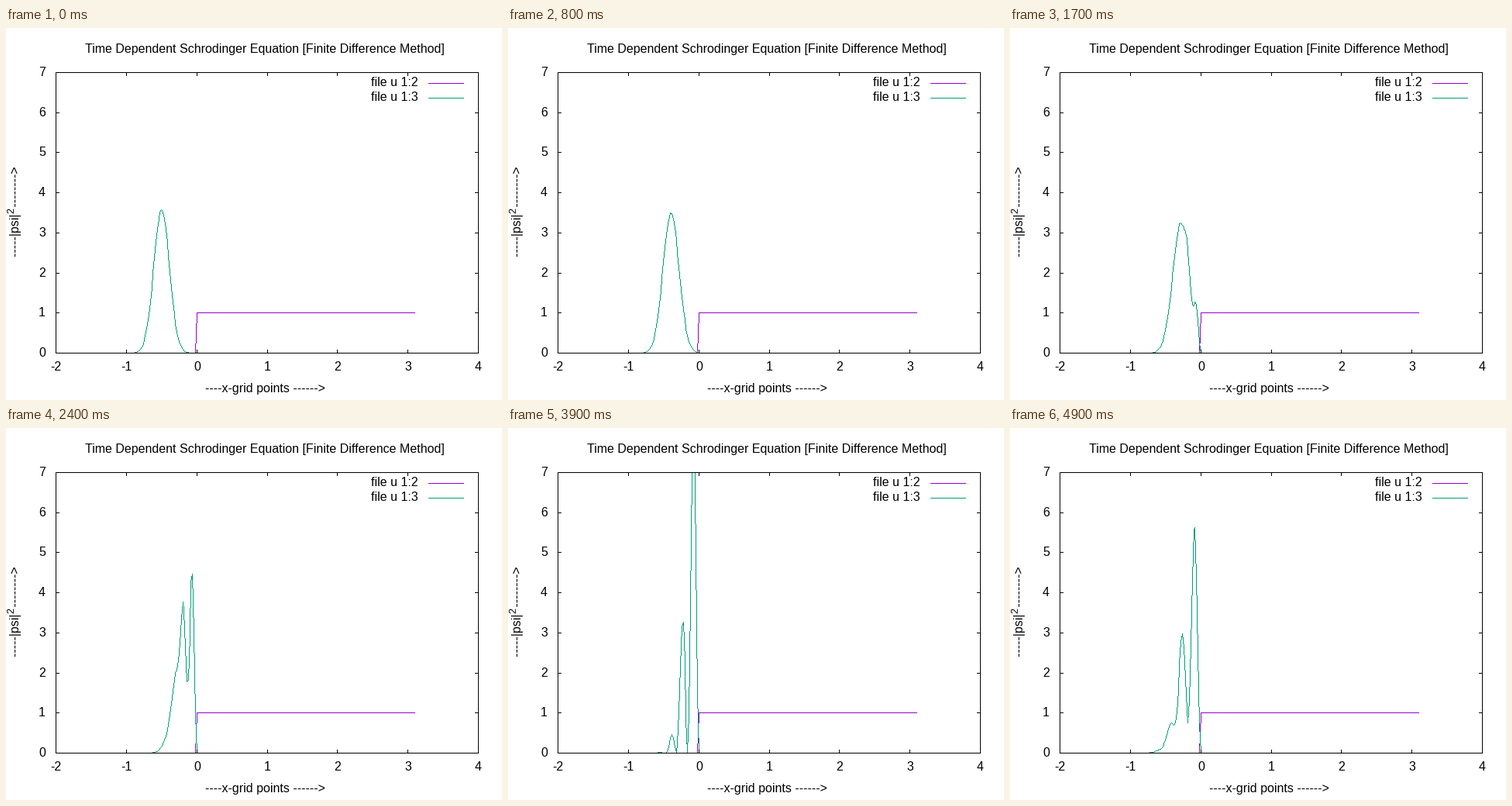
A matplotlib script that plays this animation: 640x480 px, repeating every 5000 ms.

```python
import numpy as np
import matplotlib.pyplot as plt
from matplotlib.animation import FuncAnimation
from matplotlib.colors import to_rgba

WIDTH, HEIGHT, DPI = 640, 480, 100
FRAMES, INTERVAL = 50, 100
PT = 72 / DPI                                # one pixel in points
LEFT, RIGHT, TOP, BOTTOM = 64, 609, 57, 419  # plot frame, pixel rows and columns
GREEN, PURPLE = "#009e73", "#9400d3"

plt.rcParams["font.family"] = "Liberation Sans"

# Gaussian packet on a lattice, running into a hard wall at x = 0
DX = 0.02
WAVE_NUMBER = 20
START = -0.5
TIME_STEP = 0.000683

grid = DX * np.arange(-155, 1)
inner = grid[1:-1]
hop = np.full(len(inner) - 1, -0.5 / DX**2)
hamiltonian = np.eye(len(inner)) / DX**2 + np.diag(hop, 1) + np.diag(hop, -1)
energies, modes = np.linalg.eigh(hamiltonian)
packet = (40 / np.pi) ** 0.25 * np.exp(-20 * (inner - START) ** 2 + 1j * WAVE_NUMBER * inner)
weights = modes.T @ packet


def density(frame):
    psi = modes @ (weights * np.exp(-1j * energies * TIME_STEP * frame))
    return np.concatenate(([0], np.abs(psi) ** 2, [0]))


def nearest(value):
    return np.floor(np.asarray(value) + 0.5).astype(int)


def column(x):
    return nearest(LEFT + (np.asarray(x) + 2) * (RIGHT - LEFT) / 6)


def row(y):
    return nearest(BOTTOM - np.asarray(y) * (BOTTOM - TOP) / 7)


def paint(image, xs, ys, color):
    """Draw a one-pixel polyline without smoothing, clipped to the plot frame."""
    cols, rows = column(xs), row(ys)
    for c0, r0, c1, r1 in zip(cols, rows, cols[1:], rows[1:]):
        count = max(abs(c1 - c0), abs(r1 - r0)) + 1
        c = nearest(np.linspace(c0, c1, count)) - LEFT
        r = nearest(np.linspace(r0, r1, count)) - TOP
        inside = (c >= 0) & (c < image.shape[1]) & (r >= 0) & (r < image.shape[0])
        image[r[inside], c[inside]] = to_rgba(color)


fig = plt.figure(figsize=(WIDTH / DPI, HEIGHT / DPI), dpi=DPI, facecolor="white")
ax = fig.add_axes([0, 0, 1, 1])
ax.axis("off")


def stroke(x0, y0, x1, y1, color="black"):
    ax.plot([x0, x1], [y0, y1], color=color, lw=PT, snap=False, zorder=5,
            solid_capstyle="butt")


def label(x, y, text, ha="left", size=16, rotation=0):
    ax.text(x, y, text, ha=ha, va="baseline", fontsize=size * PT, color="black",
            rotation=rotation, rotation_mode="anchor")


def draw_frame():
    for y in (TOP, BOTTOM):
        stroke(LEFT, y + 0.5, RIGHT + 1, y + 0.5)
    for x in (LEFT, RIGHT):
        stroke(x + 0.5, TOP, x + 0.5, BOTTOM + 1)
    for value in range(-2, 5):
        x = column(value)
        stroke(x + 0.5, TOP, x + 0.5, TOP + 5)
        stroke(x + 0.5, BOTTOM - 4, x + 0.5, BOTTOM + 1)
        label(x - (7 if value < 0 else 4), 442, str(value))
    for value in range(8):
        y = row(value)
        stroke(LEFT, y + 0.5, LEFT + 5, y + 0.5)
        stroke(RIGHT - 4, y + 0.5, RIGHT + 1, y + 0.5)
        label(42, y + 5, str(value))


def draw_labels():
    label(333.5, 32, "Time Dependent Schrodinger Equation [Finite Difference Method]",
          ha="center")
    label(334.5, 470, "----x-grid points ------>", ha="center")
    label(17, 295, "-----|psi|  -------->", rotation=90)
    label(10, 239, "2", size=12.8, rotation=90)
    for y, text, color in ((71, "file u 1:2", PURPLE), (90, "file u 1:3", GREEN)):
        label(531.5, y + 4, text, ha="right")
        stroke(545, y + 0.5, 591, y + 0.5, color)


draw_frame()
draw_labels()

barrier = np.zeros((BOTTOM - TOP + 1, RIGHT - LEFT + 1, 4))
paint(barrier, [-DX, 0, 3.1], [0, 1, 1], PURPLE)


def plot_area(frame):
    image = barrier.copy()
    paint(image, grid, density(frame), GREEN)
    return image


picture = ax.imshow(plot_area(0), extent=(LEFT, RIGHT + 1, BOTTOM + 1, TOP),
                    interpolation="nearest", aspect="auto", zorder=1)
ax.set_xlim(0, WIDTH)
ax.set_ylim(HEIGHT, 0)


def update(frame):
    picture.set_data(plot_area(frame))
    return (picture,)


animation = FuncAnimation(fig, update, frames=FRAMES, interval=INTERVAL,
                          repeat=True, repeat_delay=0, blit=False)
plt.show()
```
